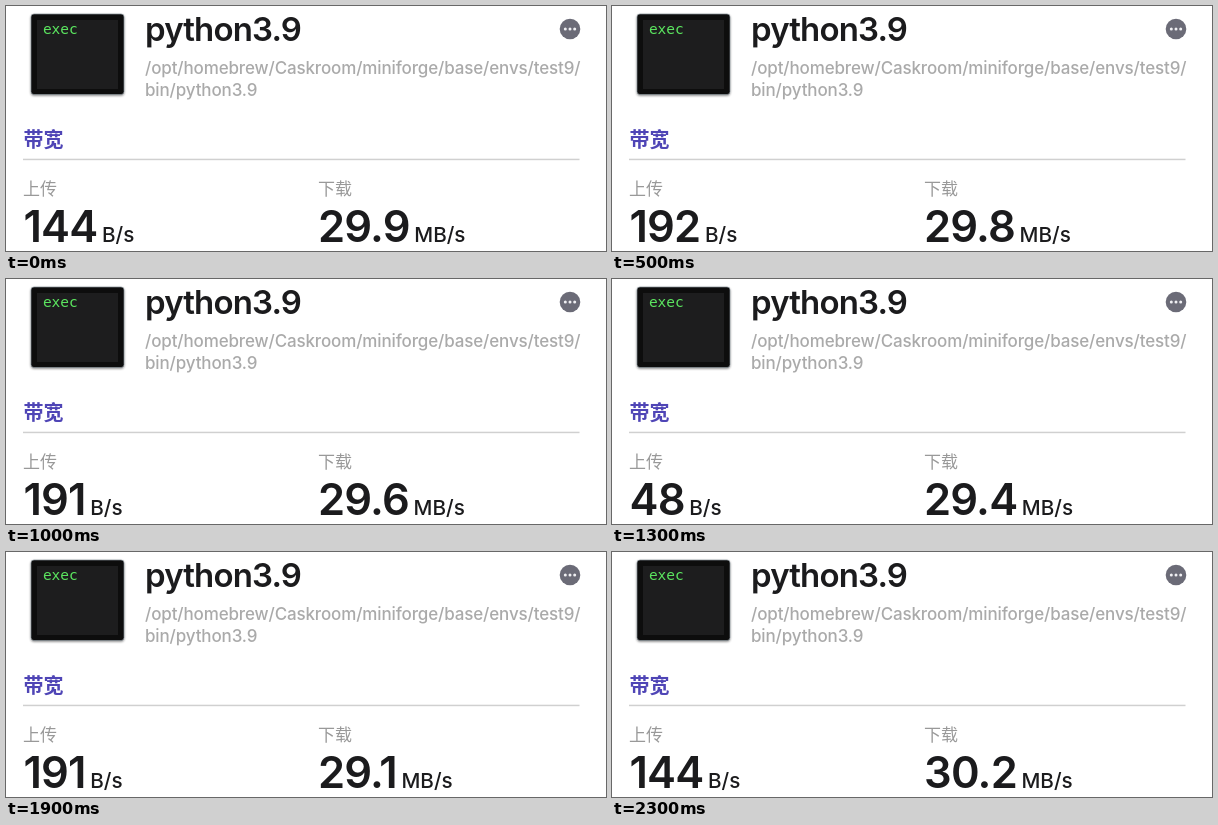
An HTML page for the animation above (2400 ms loop, 600 px wide and 245 px high).

```html
<!DOCTYPE html>
<html lang="zh-CN">
<head>
<meta charset="utf-8">
<title>带宽</title>
<style>
  html, body { margin: 0; width: 100%; height: 100%; overflow: hidden; background: #fff; }
  svg { display: block; width: 600px; height: 245px; }
  text { font-family: Inter, "Noto Sans CJK SC", "Noto Sans CJK", sans-serif; }
  .title { font-size: 33px; font-weight: 600; letter-spacing: -.85px; fill: #1b1b1d; }
  .path { font-size: 17px; font-weight: 500; letter-spacing: -.137px; fill: #aaa; }
  .section, .label { font-family: "Noto Sans CJK SC", "Noto Sans CJK", sans-serif; }
  .section { font-size: 20px; font-weight: 700; fill: #4f45b6; }
  .label { font-size: 17px; fill: #999; }
  .value { font-size: 43.5px; font-weight: 600; letter-spacing: -.8px; fill: #1b1b1d; }
  .unit { font-size: 20.7px; font-weight: 500; letter-spacing: 0; }
  .exec { font: 14.5px "DejaVu Sans Mono", monospace; fill: #5be45f; }
</style>
</head>
<body>
<svg viewBox="0 0 600 245">
  <defs>
    <filter id="shadow" x="-10%" y="-10%" width="120%" height="120%">
      <feDropShadow dx="0" dy="1" stdDeviation="1.2" flood-opacity=".45"/>
    </filter>
  </defs>

  <g>
    <rect x="25" y="8" width="93" height="80.5" rx="3" fill="#070708" stroke="#8d959b" stroke-width=".7" filter="url(#shadow)"/>
    <rect x="31" y="14" width="81" height="69" fill="#1d1d1e"/>
    <text class="exec" x="36.9" y="28">exec</text>
  </g>

  <text class="title" x="139" y="35">python3.9</text>
  <text class="path" x="139" y="68">/opt/homebrew/Caskroom/miniforge/base/envs/test9/</text>
  <text class="path" x="139" y="90">bin/python3.9</text>

  <circle cx="564" cy="23" r="10.3" fill="#6b6b77"/>
  <g fill="#f0f0f3">
    <circle cx="559.3" cy="23" r="1.5"/>
    <circle cx="564" cy="23" r="1.5"/>
    <circle cx="568.7" cy="23" r="1.5"/>
  </g>

  <text class="section" x="17.5" y="140.5">带宽</text>
  <rect x="17" y="152.7" width="556.5" height="1.5" fill="#d0d0d0"/>

  <text class="label" x="17" y="188.5">上传</text>
  <text class="label" x="312" y="188.5">下载</text>
  <text class="value" x="17.5" y="235.8"><tspan id="up">144</tspan><tspan class="unit" dx="4.5">B/s</tspan></text>
  <text class="value" x="312" y="235.8"><tspan id="down">29.9</tspan><tspan class="unit" dx="4.5">MB/s</tspan></text>
</svg>
<script>
  const LOOP = 2400;
  // start time in ms, upload, download
  const readings = [
    [0, "144", "29.9"],
    [500, "192", "29.8"],
    [1000, "191", "29.6"],
    [1300, "48", "29.4"],
    [1500, "192", "30.3"],
    [1900, "191", "29.1"],
    [2300, "144", "30.2"]
  ];
  const up = document.getElementById("up");
  const down = document.getElementById("down");
  const start = performance.now();
  let shown = null;

  function draw() {
    const t = Math.max(0, performance.now() - start) % LOOP;
    const reading = readings.findLast(r => r[0] <= t);
    if (reading !== shown) {
      shown = reading;
      up.textContent = reading[1];
      down.textContent = reading[2];
    }
    requestAnimationFrame(draw);
  }
  draw();
</script>
</body>
</html>
```
